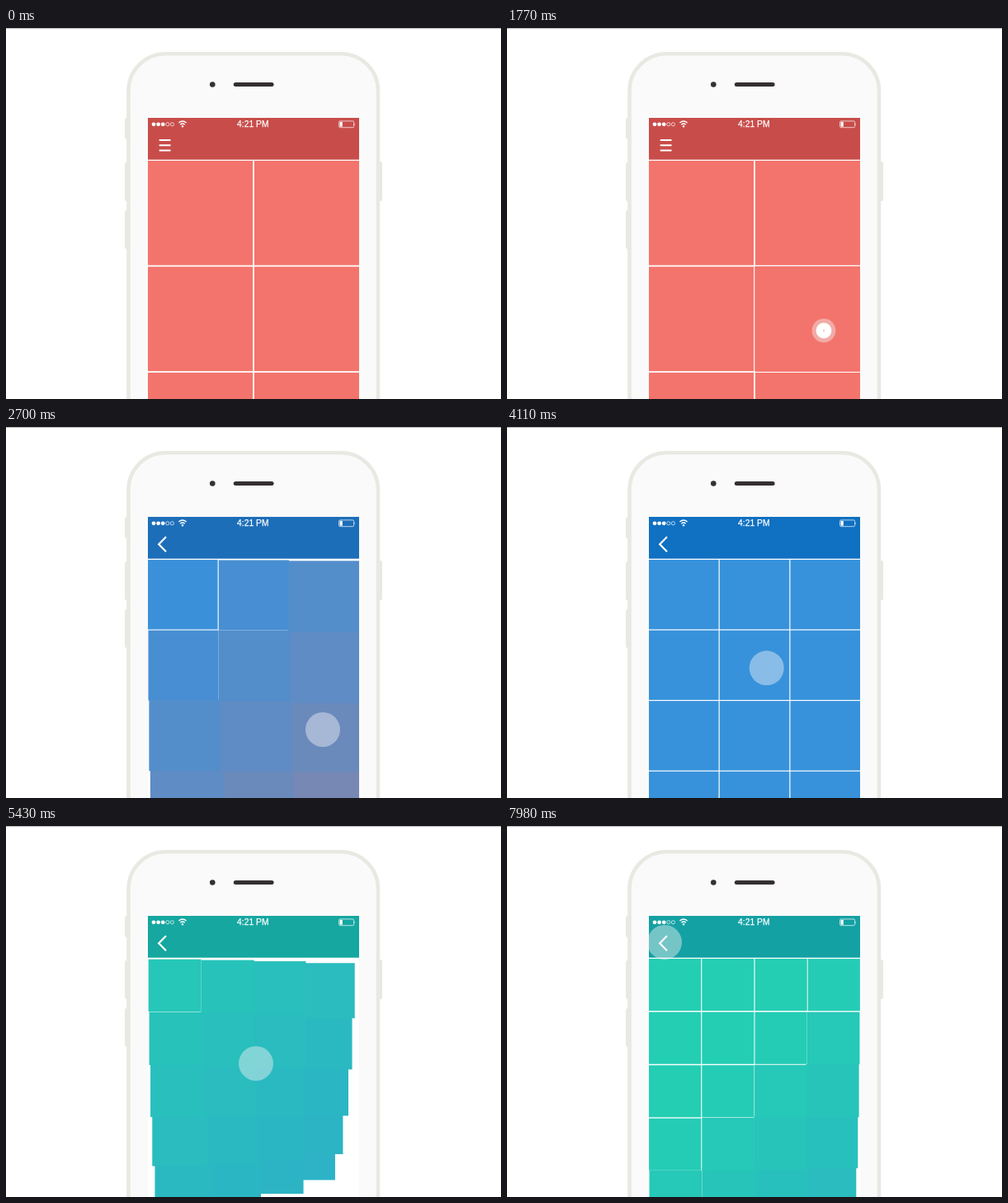
Recreate the animation shown at these times as an HTML page. Size 600 by 450 pixels, loop 8 s.

```html
<!DOCTYPE html>
<html lang="en">
<head>
<meta charset="utf-8">
<title>Grid transition</title>
<style>
  html, body { margin: 0; width: 100%; height: 100%; overflow: hidden; background: #fff; }
  svg { display: block; width: 600px; height: 450px; }
  text { font: 10.3px "Liberation Sans", Arial, sans-serif; fill: #fff; stroke: #fff; stroke-width: .25px; }
</style>
</head>
<body>
<svg viewBox="0 0 600 450">
  <defs>
    <clipPath id="screen"><rect x="172" y="160" width="256" height="290"/></clipPath>
  </defs>
  <rect width="600" height="1" fill="#b9b9b9"/>

  <g fill="#e9e9e3">
    <rect x="144" y="109" width="6" height="26" rx="2"/>
    <rect x="144" y="163" width="6" height="47" rx="2"/>
    <rect x="144" y="221" width="6" height="47" rx="2"/>
    <rect x="450" y="162" width="6" height="48" rx="2"/>
  </g>
  <rect x="148.5" y="31.2" width="302.5" height="560" rx="45" fill="#fafafa" stroke="#e9e9e3" stroke-width="4.6"/>
  <circle cx="250.3" cy="68.5" r="3.3" fill="#342f31"/>
  <rect x="275.8" y="66" width="48.8" height="5" rx="2.5" fill="#342f31"/>

  <rect x="172" y="109" width="256" height="341" fill="#fff"/>
  <g clip-path="url(#screen)">
    <g id="below"></g>
    <g id="above"></g>
  </g>
  <rect id="bar" x="172" y="109" width="256" height="50.7"/>

  <g fill="#fff">
    <circle cx="179" cy="116.8" r="2.4"/>
    <circle cx="184.6" cy="116.8" r="2.4"/>
    <circle cx="190.2" cy="116.8" r="2.4"/>
    <rect x="404.6" y="113.9" width="3.2" height="5.8"/>
    <path d="M422.4 115.4q1.2 1.4 0 2.8z"/>
    <circle cx="214" cy="119.2" r="1.2"/>
  </g>
  <g fill="none" stroke="#fff">
    <g stroke-width=".7">
      <circle cx="195.8" cy="116.8" r="2.1"/>
      <circle cx="201.4" cy="116.8" r="2.1"/>
      <rect x="403.6" y="112.9" width="18" height="7.8" rx="1.3"/>
    </g>
    <path d="M209.4 115q4.6-4 9.2 0M211.3 117.2q2.7-2.3 5.4 0" stroke-width="1.4"/>
    <path id="menu" d="M185.7 136h13.8M185.7 142.2h13.8M185.7 148.4h13.8" stroke-width="2"/>
    <path id="back" d="M194 133.2l-8.8 9 8.8 9" stroke-width="2.2"/>
  </g>
  <text x="299.3" y="120.4" text-anchor="middle">4:21 PM</text>

  <g id="touch">
    <circle id="disc" fill="#f2f2f4" fill-opacity=".44"/>
    <circle id="ring" fill="none" stroke="#fff"/>
  </g>
</svg>
<script>
const LOOP = 8000, STAGGER = 60, TILE_TIME = 960, DELAY = 150;
const LEFT = 172, TOP = 161;
const OPEN_A = 1620, OPEN_B = 4440, CLOSE = 7695, CLOSE_LENGTH = 1530;

const grids = [
  { cols: 2, rows: 3, pitch: 128.5, gapX: 1.8, gapY: 1.8, tile: [243, 116, 108], bar: [200, 77, 74] },
  { cols: 3, rows: 4, pitch: 85.6, gapX: 1.2, gapY: 1.2, tile: [55, 146, 219], bar: [16, 112, 193] },
  { cols: 4, rows: 5, pitch: 64.6, gapX: 1.1, gapY: 1.5, tile: [36, 206, 179], bar: [22, 178, 154] }
];

// Cursor moves: start, duration, cubic path points
const moves = [
  { at: 810, time: 690, path: [[530, 223], [481, 271], [433, 319], [384, 367]] },
  { at: 3630, time: 690, path: [[384, 367], [456, 320], [328, 300], [303, 288]] },
  { at: 6930, time: 590, path: [[303, 288], [266, 239], [228, 190], [191, 141]] }
];
const taps = [OPEN_A, OPEN_B, 7500];

const $ = id => document.getElementById(id);
const clamp = v => Math.min(1, Math.max(0, v));
const lerp = (a, b, k) => a + (b - a) * k;
const smooth = v => { const u = clamp(v); return u * u * (3 - 2 * u); };
const cubic = v => { const u = clamp(v); return u < .5 ? 4 * u ** 3 : 1 - 4 * (1 - u) ** 3; };
const mix = (a, b, k) => `rgb(${a.map((v, i) => Math.round(lerp(v, b[i], k)))})`;
const bez = (a, b, c, d, k) => {
  const m = 1 - k;
  return a * m ** 3 + 3 * b * m * m * k + 3 * c * m * k * k + d * k ** 3;
};

function set(el, attrs) {
  for (const name in attrs) el.setAttribute(name, attrs[name]);
}

// Value at t in a list of [time, value] steps
function track(steps, t) {
  if (t <= steps[0][0]) return steps[0][1];
  for (let i = 1; i < steps.length; i++) {
    const [t0, v0] = steps[i - 1], [t1, v1] = steps[i];
    if (t < t1) return lerp(v0, v1, (t - t0) / (t1 - t0));
  }
  return steps[steps.length - 1][1];
}

// Tile travel: slow start, fast middle, long settle
function travel(v) {
  const u = clamp(v);
  if (u === 0 || u === 1) return u;
  let lo = 0, hi = 1;
  for (let i = 0; i < 24; i++) {
    const k = (lo + hi) / 2;
    if (bez(0, .45, .23, 1, k) < u) lo = k; else hi = k;
  }
  return bez(0, 0, 1, 1, lo);
}

const tint = [[150, 0], [510, .5], [780, .66], [1100, 1]];
const discSize = [[0, 21], [140, 14.3], [180, 14.6], [440, 21]];
const ringOuter = [[40, 0], [150, 9.4], [460, 21]];
const ringInner = [[130, 0], [150, .9], [460, 21]];

function cell(g, col, row) {
  const w = (256 + g.gapX) / g.cols;
  return {
    w: w - g.gapX, h: g.pitch - g.gapY,
    x: LEFT + col * w + (w - g.gapX) / 2,
    y: TOP + row * g.pitch + (g.pitch - g.gapY) / 2
  };
}

function makePool(parent) {
  return Array.from({ length: 20 }, () =>
    parent.appendChild(document.createElementNS("http://www.w3.org/2000/svg", "rect")));
}
const below = makePool($("below")), above = makePool($("above"));

// Last tiles first, so that the leading corner lies on top
function tilesOf(g) {
  const list = [];
  for (let row = 0; row < g.rows; row++)
    for (let col = 0; col < g.cols; col++) list.push({ col, row, rank: col + row });
  return list.sort((a, b) => b.rank - a.rank || b.row - a.row);
}
grids.forEach(g => g.tiles = tilesOf(g));

function place(el, c, fill) {
  set(el, { x: c.x - c.w / 2, y: c.y - c.h / 2, width: c.w, height: c.h, fill, visibility: "visible" });
}
function hide(pool, from) {
  for (let i = from; i < pool.length; i++) pool[i].setAttribute("visibility", "hidden");
}

function drawGrids(from, to, s) {
  const fade = 1 - clamp((s - DELAY) / 470);
  $("below").setAttribute("opacity", fade);
  from.tiles.forEach((n, i) => place(below[i], cell(from, n.col, n.row), mix(from.tile, from.tile, 0)));
  hide(below, from.tiles.length);

  if (s <= DELAY) return hide(above, 0);
  const start = cell(from, 1, 1);
  const pressed = 1 - .08 * smooth((s - DELAY) / 150);
  to.tiles.forEach((n, i) => {
    const own = s - n.rank * STAGGER;
    const p = travel((own - DELAY) / TILE_TIME), q = p ** 4;
    const end = cell(to, n.col, n.row);
    place(above[i], {
      x: lerp(start.x, end.x, p), y: lerp(start.y, end.y, p),
      w: lerp(start.w * pressed, end.w, q), h: lerp(start.h * pressed, end.h, q)
    }, mix(from.tile, to.tile, track(tint, own)));
  });
  hide(above, to.tiles.length);
}

function drawTouch(t) {
  const move = moves.filter(m => t >= m.at).pop() || moves[0];
  const k = cubic((t - move.at) / move.time);
  const [x, y] = [0, 1].map(i => bez(...move.path.map(pt => pt[i]), k));
  set($("touch"), { transform: `translate(${x} ${y})`, opacity: clamp((t - 10) / 520) });

  const tap = taps.filter(v => t >= v).pop();
  const s = tap === undefined ? 0 : t - tap;
  $("disc").setAttribute("r", track(discSize, s));
  const out = track(ringOuter, s), inn = track(ringInner, s);
  set($("ring"), { r: (out + inn) / 2, "stroke-width": out - inn });
}

function draw(t) {
  const first = t < OPEN_B, closing = t >= CLOSE;
  const [from, to] = first ? [grids[0], grids[1]] : [grids[1], grids[2]];
  const s = closing ? CLOSE_LENGTH - (t - CLOSE) : t - (first ? OPEN_A : OPEN_B);
  const bar = closing ? 1 - smooth((t - CLOSE) / 850) : smooth((s - 300) / 930);
  const icon = first ? smooth((s - 300) / 400) : 1;

  drawGrids(from, to, s);
  $("bar").setAttribute("fill", mix(from.bar, to.bar, bar));
  $("menu").setAttribute("opacity", 1 - icon);
  $("back").setAttribute("opacity", icon);
  drawTouch(t);
}

const begin = performance.now();
function tick() {
  draw((performance.now() - begin) % LOOP);
  requestAnimationFrame(tick);
}
tick();
</script>
</body>
</html>
```
